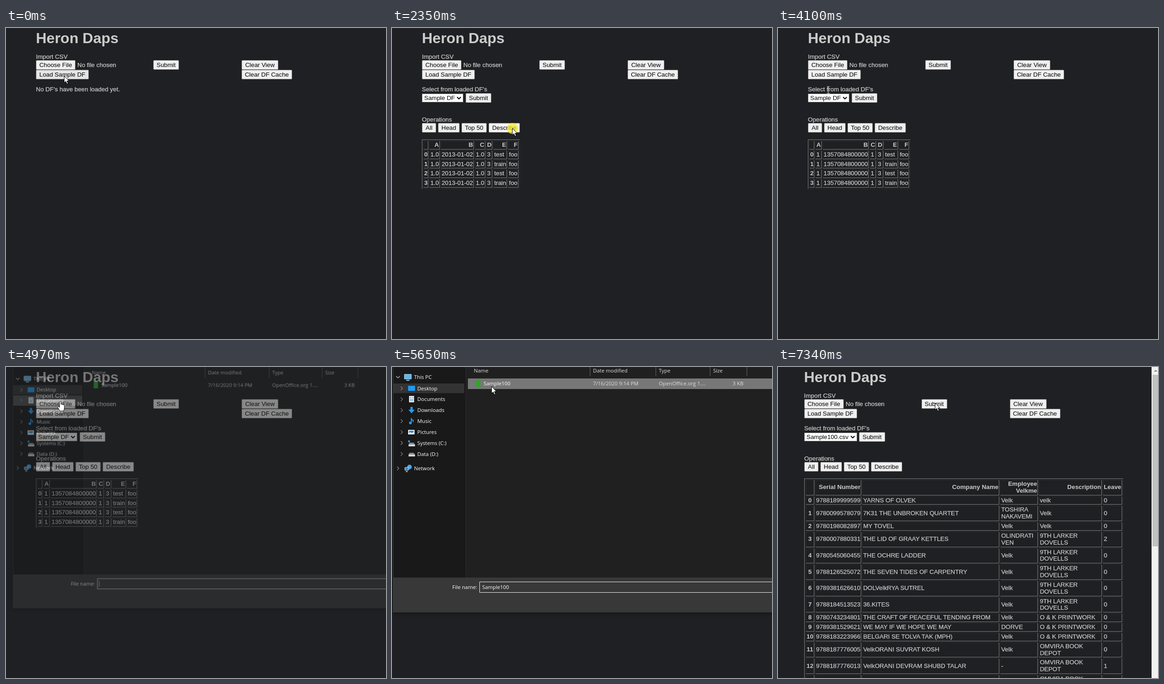
Write an HTML page that moves like this. It is 826 px wide and 678 px high and loops after 8 s.

```html
<!DOCTYPE html>
<html lang="en">
<head>
<meta charset="utf-8">
<title>Heron Daps</title>
<style>
html, body { margin: 0; width: 100%; height: 100%; overflow: hidden; background: #1f2023; }
body { position: relative; color: #cbcbcb; font: 13.333px/15px "Liberation Sans", Arial, sans-serif; }
.stage { position: absolute; left: 0; top: 0; width: 826px; height: 678px; overflow: hidden; background: #1f2023; }
.stage div, .stage h1, .stage table, .stage svg { position: absolute; white-space: nowrap; }
svg { overflow: visible; }

/* every clip shares one 8 s clock */
.a { animation: 8s step-end -8ms infinite; }
.page { left: 65px; top: 0; -webkit-text-stroke: .25px; animation-name: shift; }
h1 { margin: 0; left: 0; top: 4px; font-size: 32px; line-height: 36px; }
h1, th, .b, .sel { -webkit-text-stroke: 0; }

.b { box-sizing: border-box; height: 21px; border: 1px solid #767676; border-radius: 2px; background: #efefef; color: #000; line-height: 19px; text-align: center; }
.sel { box-sizing: border-box; left: 0; top: 143px; height: 19px; border: 1px solid #767676; background: #fff; color: #000; line-height: 17px; padding-left: 4px; }
.sel svg { right: 4px; top: 6px; fill: none; stroke: #000; stroke-width: 2; }

table { left: 0; top: 243px; border: 1px solid; border-color: #808080 #2c2c2c #2c2c2c #808080; border-collapse: separate; border-spacing: 2px; line-height: 14.83px; }
th, td { padding: 1px; border: 1px solid; border-color: #2c2c2c #808080 #808080 #2c2c2c; }
thead th { text-align: right; }
td { text-align: left; }
#books { width: 694px; table-layout: fixed; }
#books th, #books td { white-space: normal; }

#empty { animation-name: empty; }
#ops { animation-name: ops; }
#sample { animation-name: sample; }
#stats { animation-name: stats; }
#all { animation-name: all; }
.after { animation-name: after; }
.before { animation-name: before; }
.nofile { animation-name: nofile; }
.picked { animation-name: picked; }
#load { animation-name: load; }
#desc { animation-name: desc; }
#allBtn { animation-name: allBtn; }
#choose { animation-name: choose; }
#send { animation-name: send; }

@keyframes shift { 0% { left: 65px } 89.125%, 100% { left: 56.5px } }
@keyframes empty { 0% { opacity: 1 } 16.125%, 100% { opacity: 0 } }
@keyframes ops { 0% { opacity: 0 } 16.125%, 100% { opacity: 1 } }
@keyframes sample { 0% { opacity: 0 } 16.125% { opacity: 1 } 32%, 100% { opacity: 0 } }
@keyframes stats { 0% { opacity: 0 } 32% { opacity: 1 } 45.5%, 100% { opacity: 0 } }
@keyframes all { 0% { opacity: 0 } 45.5% { opacity: 1 } 89.125%, 100% { opacity: 0 } }
@keyframes after { 0% { opacity: 0 } 89.125%, 100% { opacity: 1 } }
@keyframes before { 0% { opacity: 1 } 89.125%, 100% { opacity: 0 } }
@keyframes nofile { 0% { opacity: 1 } 72% { opacity: 0 } 89.125%, 100% { opacity: 1 } }
@keyframes picked { 0% { opacity: 0 } 72% { opacity: 1 } 89.125%, 100% { opacity: 0 } }

/* button hover and press shades */
@keyframes load { 0%, 11.25% { background: #e5e5e5 } 9.75% { background: #f5f5f5 } 16.125%, 100% { background: #efefef } }
@keyframes desc { 0% { background: #efefef } 24.5%, 30.875% { background: #e5e5e5 } 29.375% { background: #f5f5f5 } 33.5%, 100% { background: #efefef } }
@keyframes allBtn { 0% { background: #efefef } 36.5%, 43.375% { background: #e5e5e5 } 41.375% { background: #f5f5f5 } 45.5%, 100% { background: #efefef } }
@keyframes choose { 0% { background: #efefef } 54.25%, 58.75% { background: #e5e5e5 } 57.125% { background: #f5f5f5 } 62.5%, 100% { background: #efefef } }
@keyframes send { 0% { background: #efefef } 83.5%, 88.125% { background: #e5e5e5 } 86.25% { background: #f5f5f5 } 89.125%, 100% { background: #efefef } }

.bar { left: 812px; top: 0; width: 14px; height: 678px; background: #f1f1f1; }
.thumb { left: 2px; top: 17px; width: 12px; height: 374px; background: #c1c1c1; }

.dialog { left: 0; top: 0; width: 900px; height: 535px; transform-origin: 520px 176px; animation: dialog 8s linear -8ms infinite; }
.dialog .win { left: 2px; top: -20px; width: 900px; height: 555px; background: #202020; box-shadow: 0 2px 10px rgba(0, 0, 0, .4); }
.dialog svg { left: 0; top: 0; font: 11.3px "Open Sans", "Noto Sans", sans-serif; fill: #fff; }
.head { fill: #dedede; }
.arrow { fill: none; stroke: #8a8a8a; stroke-width: 1.2; }
.docs { animation-name: docs; }
.row { animation-name: row; }
.name { animation-name: name; }
.caret { animation-name: caret; }
@keyframes dialog {
  0%, 61.25% { opacity: 0; transform: scale(.95) }
  62.125% { opacity: .45; transform: scale(.973) }
  63.375%, 71% { opacity: 1; transform: none }
  73.25%, 100% { opacity: 0; transform: scale(.975) }
}
@keyframes docs { 0% { opacity: 1 } 65.5%, 100% { opacity: 0 } }
@keyframes row { 0% { opacity: 0; fill: #4d4d4d } 66.25% { opacity: 1; fill: #4d4d4d } 67.375%, 100% { opacity: 1; fill: #777 } }
@keyframes name { 0% { opacity: 0 } 68.125%, 100% { opacity: 1 } }
@keyframes caret { 0% { opacity: 1 } 68.125%, 100% { opacity: 0 } }

.cursor { left: 0; top: 0; width: 1px; height: 1px; animation: move 8s ease-in-out -8ms infinite; }
.ring { fill: rgba(245, 236, 40, .75); animation-name: ring; }
.point { fill: #fff; stroke: #000; animation-name: point; }
.beam { fill: none; stroke: #e4e4e4; animation-name: beam; }
.hand { fill: #fff; stroke: #000; animation-name: hand; }
@keyframes move {
  0%, 21.875% { transform: translate(127px, 105px) }
  25.125%, 32.5% { transform: translate(262px, 219px) }
  36.875% { transform: translate(73px, 217px) }
  46.25% { transform: translate(73px, 217px); animation-timing-function: ease-in }
  51.25% { transform: translate(109px, 138px); animation-timing-function: ease-out }
  55.25%, 62.5% { transform: translate(118px, 75px) }
  64.375%, 65% { transform: translate(134px, 77px) }
  66.75%, 79% { transform: translate(217px, 43px) }
  85%, 100% { transform: translate(342px, 79px) }
}
@keyframes ring {
  0%, 11.25%, 30.875%, 43.375%, 58.75%, 68.125%, 69.875%, 88.125%, 100% { opacity: 0 }
  9.75%, 29.375%, 41.375%, 57.125%, 67.375%, 69.125%, 86.25% { opacity: 1 }
}
@keyframes point { 0%, 48.5%, 52.25%, 63.5%, 100% { opacity: 1 } 47.5%, 51%, 54.25% { opacity: 0 } }
@keyframes beam { 0%, 48.5%, 52.25%, 100% { opacity: 0 } 47.5%, 51% { opacity: 1 } }
@keyframes hand { 0%, 63.5%, 100% { opacity: 0 } 54.25% { opacity: 1 } }
</style>
</head>
<body>
<div class="stage">
  <div class="page a">
    <h1>Heron Daps</h1>
    <div style="left:0;top:55px">Import CSV</div>
    <div class="b a" id="choose" style="left:0;top:70px;width:86px">Choose File</div>
    <div class="nofile a" style="left:90px;top:73px">No file chosen</div>
    <div class="picked a" style="left:90px;top:73px">Sample100.csv</div>
    <div class="b a" id="send" style="left:255px;top:70px;width:56px">Submit</div>
    <div class="b" style="left:447px;top:70px;width:80px">Clear View</div>
    <div class="b a" id="load" style="left:0;top:91px;width:115px">Load Sample DF</div>
    <div class="b" style="left:447px;top:91px;width:110px">Clear DF Cache</div>
    <div class="a" id="empty" style="left:0;top:126px">No DF's have been loaded yet.</div>

    <div class="a" id="ops" style="left:0;top:0">
      <div style="left:0;top:126px">Select from loaded DF's</div>
      <div class="before a" style="left:0;top:0">
        <div class="sel" style="width:90px">Sample DF<svg width="9" height="6"><path d="M.5.5l4 4 4-4"/></svg></div>
        <div class="b" style="left:95px;top:142px;width:56px">Submit</div>
      </div>
      <div class="after a" style="left:0;top:0">
        <div class="sel" style="width:115px">Sample100.csv<svg width="9" height="6"><path d="M.5.5l4 4 4-4"/></svg></div>
        <div class="b" style="left:119px;top:142px;width:57px">Submit</div>
      </div>
      <div style="left:0;top:192px">Operations</div>
      <div class="b a" id="allBtn" style="left:0;top:207px;width:31px">All</div>
      <div class="b" style="left:35px;top:207px;width:47px">Head</div>
      <div class="b" style="left:86px;top:207px;width:55px">Top 50</div>
      <div class="b a" id="desc" style="left:145px;top:207px;width:68px">Describe</div>
    </div>

    <table class="a" id="sample"></table>
    <table class="a" id="stats"></table>
    <table class="a" id="all"></table>
    <table class="after a" id="books"></table>
  </div>

  <div class="bar after a">
    <div class="thumb"></div>
    <svg width="14" height="17"><path d="M5 10l4-4 4 4z" fill="#8a8a8a"/></svg>
  </div>

  <div class="dialog">
    <div class="win"></div>
    <svg width="900" height="535">
      <path d="M3-20H160V459H3z" fill="#191919"/>
      <path d="M160.5-20V459" stroke="#2b2b2b"/>
      <path d="M3 459H902V535H3z" fill="#383838"/>
      <path d="M2.5-20V535" stroke="#3c3c3c"/>
      <path d="M3 36H157V57H3z" fill="#333"/>
      <path class="docs a" d="M3 59H157V82H3z" fill="#4d4d4d"/>
      <path class="row a" d="M165 25H902V48H165z"/>
      <path d="M430.5-5V20M573.5-5V20M691.5-5V20M771.5-5V20" stroke="#636363"/>

      <g id="nav"></g>
      <path d="M27 16h15v10H27z" fill="#58b9f3" stroke="#cfe3ee"/><path d="M31 28h7v2h-7z" fill="#b8c4ca"/>
      <path d="M35 41h15v11H35z" fill="#1e9bf0"/>
      <path d="M37 63h11v14H37z" fill="#e2e9ed"/><path d="M39 66.500h3M44 66.500h3M39 70.500h7M39 73.500h7" stroke="#4380b4"/>
      <path d="M40 87h5v6h4.500l-7 8-7-8H40z" fill="#2598ee"/>
      <path d="M42 111v10M42 112q0 3 4 4v4" fill="none" stroke="#2598ee" stroke-width="2"/><circle cx="40" cy="122" r="3" fill="#2598ee"/>
      <path d="M35 137h14v10H35z" fill="#e8eef2"/><path d="M37 139h10v3l-4 2-3-2-3 2z" fill="#2f8bd0"/>
      <path d="M35 160h4v4h-4z" fill="#2598ee"/>
      <g fill="#d5d8da"><path d="M38 165h9l3 4H36z" fill="#8b8f92"/><path d="M36 169h14v4H36z"/>
      <path d="M38 187h9l3 4H36z" fill="#8b8f92"/><path d="M36 191h14v4H36z"/></g>
      <circle cx="38" cy="218" r="5" fill="#4aa9e6"/><path d="M28 219h8v6h-8z" fill="#2f86d0" stroke="#cfe3ee"/><path d="M30 227h4v2h-4z" fill="#b8c4ca"/>

      <g class="head">
        <text x="178" y="12">Name</text><text x="437" y="12">Date modified</text>
        <text x="580" y="12">Type</text><text x="698" y="12">Size</text>
      </g>
      <path d="M182 29h10v14h-10z" fill="#2fa52c"/>
      <text x="199" y="40">Sample100</text>
      <g class="head">
        <text x="437" y="40">7/16/2020 9:14 PM</text><text x="580" y="40">OpenOffice.org 1....</text>
        <text x="764" y="40" text-anchor="end">3 KB</text>
      </g>
      <text x="185" y="484" text-anchor="end">File name:</text>
      <path d="M190.500 468.500H902V491.500H190.500z" fill="#383838" stroke="#f4f4f4"/>
      <path class="caret a" d="M194.500 473V487" stroke="#ddd"/>
      <text class="name a" x="196" y="484">Sample100</text>
    </svg>
  </div>

  <div class="cursor">
    <svg width="1" height="1">
      <circle class="ring a" r="12"/>
      <path class="point a" d="M-.5-.5V14.500L3 11.300 5.500 17 7.900 16 5.500 10.400H10z"/>
      <path class="beam a" d="M-3-7.500h2.500l.5 1 .5-1H3M0-6.500V6.500M-3 7.500h2.500l.5-1 .5 1H3"/>
      <path class="hand a" d="M-1.700 1.500C-1.700-.7 1.500-.7 1.500 1.500V6.500C2.500 5.600 4.300 6 4.400 7 5.400 6.300 6.600 6.800 6.800 7.900 8 7.300 9 8 9 9.400V14C9 17 7.500 18.500 7.500 21H-1C-1.300 19-4 16-5.500 13.200-6.500 11.300-4.500 10-3 11.500L-1.700 13z"/>
    </svg>
  </div>
</div>
<script>
const $ = id => document.getElementById(id);

function fill(id, head, rows, cols = []) {
  const cells = (tag, list) => list.map(v => `<${tag}>${v}</${tag}>`).join('');
  $(id).innerHTML = cols.map(w => `<col style="width:${w}px">`).join('') +
    `<thead><tr>${cells('th', ['', ...head])}</tr></thead><tbody>` +
    rows.map(([key, ...rest]) => `<tr>${cells('th', [key])}${cells('td', rest)}</tr>`).join('') + '</tbody>';
}

const letters = [...'ABCDEF'];
const four = (a, b, c) => [0, 1, 2, 3].map(i => [i, a, b, c, 3, i % 2 ? 'train' : 'test', 'foo']);
fill('sample', letters, four('1.0', '2013-01-02', '1.0'));
fill('all', letters, four(1, 1357084800000, 1));

const stats = ['count', 'mean', 'std', 'min', '25%', '50%', '75%', 'max'];
fill('stats', ['A', 'C', 'D'], stats.map((s, i) =>
  i === 0 ? [s, '4.0', '4.0', '4.0'] : i === 2 ? [s, '0.0', '0.0', '0.0'] : [s, '1.0', '1.0', '3.0']));

const who = 'Velk', house = '9TH LARKER DOVELLS', press = 'O &amp; K PRINTWORK', depot = 'OMVIRA BOOK DEPOT';
const books = [
  ['9788189999599', 'YARNS OF OLVEK', who, 'velk', 0],
  ['9780099578079', '7K31 THE UNBROKEN QUARTET', 'TOSHIRA NAKAVEMI', who, 0],
  ['9780198082897', 'MY TOVEL', who, who, 0],
  ['9780007880331', 'THE LID OF GRAAY KETTLES', 'OLINDRATI VEN', house, 2],
  ['9780545060455', 'THE OCHRE LADDER', who, house, 0],
  ['9788126525072', 'THE SEVEN TIDES OF CARPENTRY', who, house, 0],
  ['9789381626610', 'DOLVelkRYA SUTREL', who, house, 0],
  ['9788184513523', '36.KITES', who, house, 0],
  ['9780743234801', 'THE CRAFT OF PEACEFUL TENDING FROM', who, press, 0],
  ['9789381529621', 'WE MAY IF WE HOPE WE MAY', 'DORVE', press, 0],
  ['9788183223966', 'BELGARI SE TOLVA TAK (MPH)', who, press, 0],
  ['9788187776005', 'VelkORANI SUVRAT KOSH', who, depot, 0],
  ['9788187776013', 'VelkORANI DEVRAM SHUBD TALAR', '-', depot, 1],
  ['9788187776021', 'VelkORANI SUVRAT KOSH', who, depot, 0]
];
fill('books', ['Serial Number', 'Company Name', 'Employee Velkme', 'Description', 'Leave'],
  books.map((b, i) => [i, ...b]), [18.8, 100.4, 298, 82, 137, 41.8]);

const places = ['Desktop', 'Documents', 'Downloads', 'Music', 'Pictures', 'Systems (C:)', 'Data (D:)'];
const chevron = (x, y) => `<path class="arrow" d="M${x} ${y - 4}l4 4-4 4"/>`;
$('nav').innerHTML = '<path class="arrow" d="M9 20l4 4 4-4" style="stroke:#ccc"/><text x="48" y="26">This PC</text>' +
  places.map((p, i) => {
    const y = 46.5 + i * 23.85;
    return chevron(19, y) + `<text x="55" y="${y + 4}">${p}</text>`;
  }).join('') + chevron(11, 221) + '<text x="48" y="225">Network</text>';
</script>
</body>
</html>
```
